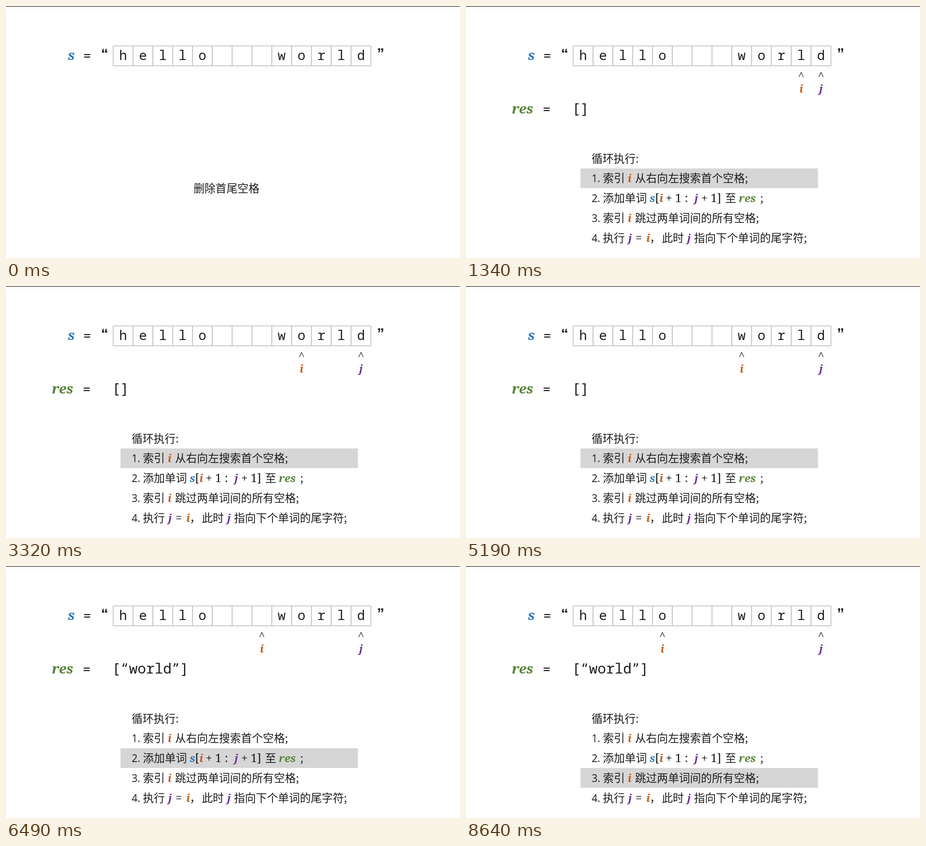
Recreate the animation shown at these times as an HTML page. Size 932 by 518 pixels, loop 9000 ms.

```html
<!DOCTYPE html>
<html lang="zh-CN">
<head>
<meta charset="utf-8">
<style>
html, body { margin: 0; width: 100%; height: 100%; overflow: hidden; background: #fff; }
svg { display: block; width: 932px; height: 518px; }
text { fill: #1c1c1c; font: 300 22.55px "Noto Sans CJK SC", "Noto Sans CJK", sans-serif; white-space: pre; }
.mono { font: 27px "Noto Sans Mono", monospace; }
.list { font-size: 29.2px; }
.quote { font: bold 30px "Liberation Sans", sans-serif; }
.num { font: 21px "Open Sans", sans-serif; }
.math { font: 23.5px "Noto Serif", serif; }
.s, .i, .j, .res { font: italic bold 22px "Noto Serif", serif; }
.big { font-size: 28px; }
.s { fill: #2878c0; }
.i { fill: #c55a11; }
.j { fill: #7030a0; }
.res { fill: #548235; }
.mid { text-anchor: middle; }
.grid { fill: none; stroke: #c8c8c8; stroke-width: 1.8; }
.caret { fill: none; stroke: #333; stroke-width: 1.3; }
</style>
</head>
<body>
<svg viewBox="0 0 932 518">
  <rect width="932" height="1"/>
  <rect id="mark" x="235" width="487.5" height="40.5" fill="#d6d6d6"/>
  <g id="scene"></g>
  <g id="pointers"></g>
  <g id="steps"></g>
  <text id="caption" x="385" y="383">删除首尾空格</text>
</svg>
<script>
const $ = id => document.getElementById(id);
const CELL = 40.7, LEFT = 220, ROW = 40.8;
const center = k => LEFT + CELL * (k + 0.5);

function add(parent, tag, attrs, text = "") {
  const node = document.createElementNS("http://www.w3.org/2000/svg", tag);
  for (const key in attrs) node.setAttribute(key, attrs[key]);
  node.textContent = text;
  return parent.appendChild(node);
}
const label = (parent, x, y, cls, text) => add(parent, "text", { x, y, class: cls }, text);

// The string and its cells
const scene = $("scene");
label(scene, 134, 111, "s big mid", "s");
label(scene, 166.5, 112, "mono mid", "=");
label(scene, 202.5, 107.5, "quote mid", "“");
label(scene, 769, 106.5, "quote mid", "”");
[..."hello   world"].forEach((c, k) => {
  add(scene, "rect", { x: LEFT + CELL * k, y: 82.2, width: CELL, height: 40.8, class: "grid" });
  label(scene, center(k), 111, "mono mid", c);
});

// Result and pointers
const pointers = $("pointers");
label(pointers, 94, 220.5, "res big", "res");
label(pointers, 165.5, 221.5, "mono mid", "=");
const result = label(pointers, 217.5, 221, "mono list", "");
const caret = () => add(pointers, "path", { d: "M-4.5 146L0 136.5L4.5 146", class: "caret" });
const caretI = caret(), caretJ = caret();
const nameI = label(pointers, 0, 178, "i mid", "i");
const nameJ = label(pointers, 0, 178, "j mid", "j");

// Loop description: each part is [x, class, text]
const steps = $("steps");
[
  [[258, "", "循环执行:"]],
  [[258, "num", "1."], [281, "", "索引"], [332, "i", "i"], [347, "", "从右向左搜索首个空格;"]],
  [[258, "num", "2."], [281, "", "添加单词"], [377, "s", "s"], [388, "math", "["], [397, "i", "i"],
   [410, "math", "+ 1"], [449, "math", ":"], [469, "j", "j"], [483, "math", "+ 1]"],
   [532, "", "至"], [560, "res", "res"], [604, "", ";"]],
  [[258, "num", "3."], [281, "", "索引"], [332, "i", "i"], [347, "", "跳过两单词间的所有空格;"]],
  [[258, "num", "4."], [281, "", "执行"], [333, "j", "j"], [348, "math", "="], [370, "i", "i"],
   [377, "", "，"], [402, "", "此时"], [454, "j", "j"], [468, "", "指向下个单词的尾字符;"]],
].forEach((parts, row) => parts.forEach(([x, cls, text]) =>
  label(steps, x, 321.5 + ROW * row, cls, text)));

// [start ms, cell of i, highlighted step]
const states = [
  [0, null, 0], [320, 12, 0], [1300, 11, 1], [2350, 10, 1],
  [3320, 9, 1], [4340, 8, 1], [5350, 7, 2], [8550, 4, 3],
];
const last = 12;
const show = (node, on) => node.setAttribute("visibility", on ? "visible" : "hidden");
const move = (node, x) => node.setAttribute("transform", `translate(${x} 0)`);

function draw(t) {
  const [, i, step] = states.findLast(([start]) => t >= start);
  const spread = i === last ? 11 : 0;
  show($("caption"), i === null);
  show(pointers, i !== null);
  show(steps, step > 0);
  show($("mark"), step > 0);
  $("mark").setAttribute("y", 293.2 + CELL * step);
  result.textContent = step > 1 ? "[“world”]" : "[]";
  move(caretI, center(i));
  move(caretJ, center(last));
  move(nameI, center(i) - spread);
  move(nameJ, center(last) + spread);
}

const begin = performance.now();
function frame() {
  draw((performance.now() - begin) % 9000);
  requestAnimationFrame(frame);
}
frame();
</script>
</body>
</html>
```
